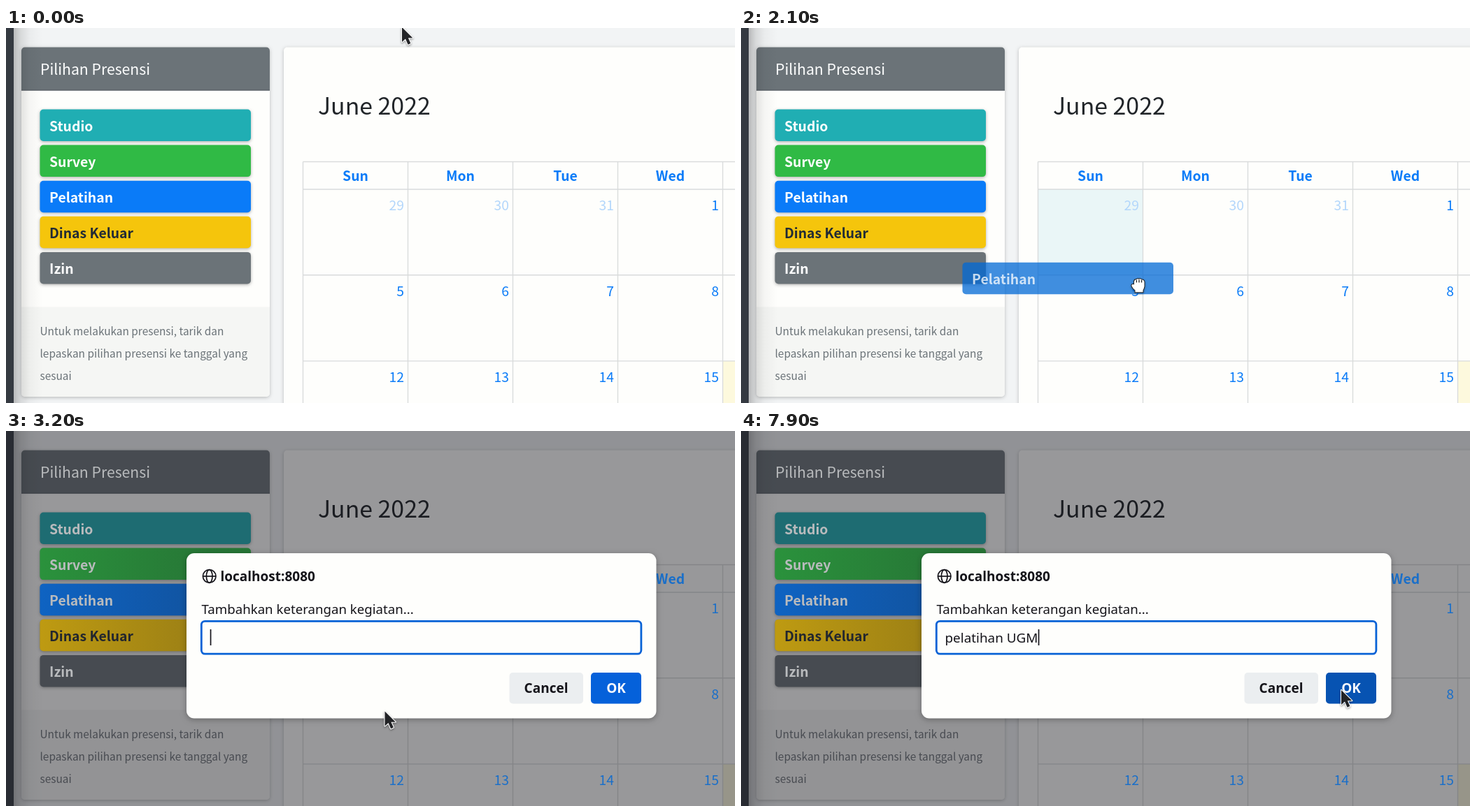
These frames come from a looping animation (1042 px wide and 537 px high, 8000 ms). An HTML page with a canvas:

```html
<!DOCTYPE html>
<html lang="id">
<head>
<meta charset="utf-8">
<title>Pilihan Presensi</title>
<style>
  html, body { margin: 0; width: 100%; height: 100%; overflow: hidden; background: #f2f4f5; }
  canvas { display: block; }
</style>
</head>
<body>
<canvas id="stage" width="1042" height="537"></canvas>
<script>
const ctx = document.getElementById('stage').getContext('2d');
const W = 1042, H = 537, LOOP = 8000, STEP = 100;
const PAGE_FONT = '"Noto Sans CJK JP", "Noto Sans CJK SC", "Noto Sans CJK", "Open Sans", sans-serif';
const DIALOG_FONT = '"Noto Sans", "Open Sans", sans-serif';
const WHITE = '#fefefc', BLUE = '#0a7bf8', GREY = '#6b7378';

const OPTIONS = [
  ['Studio', '#20aeb3'], ['Survey', '#30ba45'], ['Pelatihan', BLUE],
  ['Dinas Keluar', '#f5c50c'], ['Izin', GREY]
];
const OPTION = { x: 48.5, y: 116.5, w: 301.5, h: 45.5, pitch: 51.1 };
const DRAGGED = 2;
const GRAB = { x: 300, y: 252 };

const DAYS = ['Sun', 'Mon', 'Tue', 'Wed'];
const GRID = { x: 424.5, w: 150, top: 191.5, rows: [231, 353.7, 476.8] };

// Pointer path: time, x, y
const PATH = [
  [0, 566, -1], [800, 566, -1], [1200, 361, 234], [1300, 318, 250], [1400, 300, 252],
  [1600, 300, 252], [2100, 568, 369], [2300, 550, 426], [2400, 550, 426], [2500, 542, 418],
  [2800, 542, 418], [2900, 541.5, 401.5], [3500, 541.5, 401.5], [3700, 537, 307],
  [7100, 537, 307], [7200, 545, 320], [7300, 549, 279], [7400, 549, 279],
  [7700, 845, 362], [7900, 858, 371]
];
const TYPED = 'pelatihan UGM';
const KEY_TIMES = [4500, 4600, 4800, 4900, 5100, 5200, 5300, 5700, 5800, 5800, 6100, 6200, 6400];
const CARET_SPANS = [[3200, 4200], [4500, 5500], [5700, 6600], [7500, LOOP]];

const ARROW = new Path2D('M0 0V21L5 16.6L8.6 24.8L12.4 23L8.9 15.2H15.3Z');
const HAND = new Path2D('M-4.5 9.3V6.5Q-8 4-9.5 .5Q-10-2.5-7-2L-6-1.2V-6Q-5.5-9-2.8-8.6' +
  'Q-1.5-10.5 .8-9.3Q3-10.5 4.3-8.5Q7.8-9 8.5-5.5V1Q8 4 6.5 6.5V9.3Z');
const KNUCKLES = new Path2D('M-2.6-8V-4.5M1-8.5V-4.5M4.6-8V-4.5');
const BEAM = new Path2D('M-3.5-8.5Q-.8-8.5 0-7.2Q.8-8.5 3.5-8.5M0-7.2V7.2M-3.5 8.5Q-.8 8.5 0 7.2Q.8 8.5 3.5 8.5');

function within(t, from, to) { return t >= from && t < to; }

function pointerAt(t) {
  const i = PATH.findIndex(p => p[0] > t);
  if (i < 0) return { x: PATH.at(-1)[1], y: PATH.at(-1)[2] };
  const [t0, x0, y0] = PATH[i - 1], [t1, x1, y1] = PATH[i];
  const k = (t - t0) / (t1 - t0);
  return { x: x0 + (x1 - x0) * k, y: y0 + (y1 - y0) * k };
}

function text(str, x, y, size, color, { bold = false, align = 'left', font = PAGE_FONT } = {}) {
  ctx.font = `${bold ? 700 : 400} ${size}px ${font}`;
  ctx.textAlign = align;
  ctx.fillStyle = color;
  ctx.fillText(str, x, y);
}

function shadow(color, blur, dy) {
  ctx.shadowColor = color;
  ctx.shadowBlur = blur;
  ctx.shadowOffsetY = dy;
}

function box(x, y, w, h, radius, fill, glow) {
  ctx.save();
  if (glow) shadow(...glow);
  ctx.beginPath();
  ctx.roundRect(x, y, w, h, radius);
  ctx.fillStyle = fill;
  ctx.fill();
  ctx.restore();
}

function line(x0, y0, x1, y1) {
  ctx.beginPath();
  ctx.moveTo(x0, y0);
  ctx.lineTo(x1, y1);
  ctx.stroke();
}

function fade(x0, x1, ...stops) {
  const g = ctx.createLinearGradient(x0, 0, x1, 0);
  stops.forEach(([at, color]) => g.addColorStop(at, color));
  return g;
}

const CARD_GLOW = ['rgba(0,0,0,.24)', 5, 1.3];
const OPTION_GLOW = ['rgba(0,0,0,.3)', 4, 1.4];

function optionBox(i, fill, glow = OPTION_GLOW) {
  box(OPTION.x, OPTION.y + i * OPTION.pitch, OPTION.w, OPTION.h, 5, fill, glow);
}

function optionLabel(i, color) {
  text(OPTIONS[i][0], 62, 147.6 + i * OPTION.pitch, 19.35, color, { bold: true });
}

function drawPanels(hover, highlightRow) {
  ctx.fillStyle = '#f2f4f5';
  ctx.fillRect(0, 0, W, H);

  box(22, 27.5, 355, 500.5, 5, WHITE, CARD_GLOW);
  box(22, 399.5, 355, 128.5, [0, 0, 5, 5], '#f5f6f4');
  box(22, 27.5, 355, 62, [5, 5, 0, 0], GREY);
  ctx.fillStyle = '#5d646a';
  ctx.fillRect(22, 88.3, 355, 1.3);
  OPTIONS.forEach(([, color], i) => optionBox(i, hover && i === DRAGGED ? '#0668d2' : color));

  box(397, 27.5, 700, 560, 5, WHITE, CARD_GLOW);
  const { x, w, top, rows } = GRID;
  if (highlightRow >= 0) {
    ctx.fillStyle = '#eaf6f7';
    ctx.fillRect(x, rows[highlightRow], w, rows[highlightRow + 1] - rows[highlightRow]);
  }
  ctx.fillStyle = '#fdf9dd';
  ctx.fillRect(x + 4 * w, rows[2], W, H);
  ctx.strokeStyle = '#d9dbdc';
  ctx.lineWidth = 1.35;
  for (let c = 0; c < 5; c++) line(x + c * w, top, x + c * w, H);
  [top, ...rows].forEach(y => line(x, y, W, y));

  ctx.fillStyle = fade(11, 52, [0, 'rgba(0,0,0,.24)'], [.25, 'rgba(0,0,0,.11)'], [.55, 'rgba(0,0,0,.035)'], [1, 'rgba(0,0,0,0)']);
  ctx.fillRect(11, 0, 41, H);
  ctx.fillStyle = '#353a41';
  ctx.fillRect(0, 0, 11, H);
}

function dimPage() {
  ctx.fillStyle = 'rgba(28,27,34,.45)';
  ctx.fillRect(0, 0, W, H);
  // The vivid options keep more of their colour towards the left
  for (let i = 1; i < 4; i++) {
    const color = OPTIONS[i][1];
    optionBox(i, fade(OPTION.x, 290, [0, color + '70'], [1, color + '10']), null);
  }
}

function drawLabels(dim) {
  const light = dim ? '#b9bbbd' : '#fdfefe';
  const blue = dim ? '#1a6fc9' : BLUE;
  const muted = dim ? '#484b51' : GREY;
  text('Pilihan Presensi', 49, 66.8, 21.2, light);
  OPTIONS.forEach((_, i) => optionLabel(i, i === 3 ? (dim ? '#22262e' : '#222b35') : light));
  ['Untuk melakukan presensi, tarik dan', 'lepaskan pilihan presensi ke tanggal yang', 'sesuai']
    .forEach((row, i) => text(row, 48.5, 439.7 + i * 32.2, 15.4, muted));

  text('June 2022', 446, 124, 33.85, dim ? '#1b1d22' : '#212529');
  const { x, w, rows } = GRID;
  DAYS.forEach((day, c) => {
    text(day, x + (c + .5) * w, 219.3, 19.35, blue, { bold: true, align: 'center' });
    rows.forEach((y, r) => {
      const n = r * 7 + c - 2;
      const outside = n < 1;
      const color = outside && !dim ? '#b2d6fb' : blue;
      text(outside ? n + 31 : n, x + (c + 1) * w - 5.5, y + 30.2, 19.35, color, { align: 'right' });
    });
  });
}

function drawGhost(p) {
  ctx.save();
  ctx.globalAlpha = .75;
  ctx.translate(p.x - GRAB.x, p.y - GRAB.y);
  optionBox(DRAGGED, '#0069d6', null);
  optionLabel(DRAGGED, '#fff');
  ctx.restore();
}

function drawGlobe(x, y) {
  ctx.strokeStyle = '#15141a';
  ctx.lineWidth = 1.7;
  for (const rx of [9.3, 4.3]) {
    ctx.beginPath();
    ctx.ellipse(x, y, rx, 9.3, 0, 0, Math.PI * 2);
    ctx.stroke();
  }
  line(x - 9.3, y, x + 9.3, y);
}

function drawDialog(t, okHover) {
  const ink = '#15141a', bold = { bold: true, font: DIALOG_FONT };
  box(258, 175, 671.5, 236.5, 11, WHITE, ['rgba(0,0,0,.3)', 8, 2]);
  drawGlobe(290.7, 208);
  text('localhost:8080', 306.5, 215, 19, ink, bold);
  text('Tambahkan keterangan kegiatan...', 279.5, 262.3, 18.65, ink, { font: DIALOG_FONT });

  ctx.beginPath();
  ctx.roundRect(279.3, 272.3, 628.6, 46.8, 5);
  ctx.strokeStyle = '#0862d6';
  ctx.lineWidth = 2.8;
  ctx.stroke();

  const typed = TYPED.slice(0, KEY_TIMES.filter(k => t >= k).length);
  text(typed, 291.5, 303, 18.9, ink, { font: DIALOG_FONT });
  if (CARET_SPANS.some(span => within(t, ...span))) {
    ctx.fillRect(291.7 + ctx.measureText(typed).width, 284, 1.7, 23);
  }

  box(719.5, 346, 105.5, 44.5, 5, '#ebeef0');
  box(836, 346, 72, 44.5, 5, okHover ? '#0753b2' : '#0561da');
  text('Cancel', 772, 375.3, 19, ink, { ...bold, align: 'center' });
  text('OK', 872, 375.3, 19, '#fbfbfe', { ...bold, align: 'center' });
}

function outlined(path, fill, stroke, width) {
  ctx.lineJoin = 'round';
  ctx.save();
  shadow('rgba(0,0,0,.4)', 3, 1.3);
  ctx.strokeStyle = stroke;
  ctx.lineWidth = width;
  ctx.stroke(path);
  ctx.restore();
  ctx.fillStyle = fill;
  ctx.fill(path);
}

function drawPointer(t, p) {
  ctx.save();
  ctx.translate(p.x, p.y);
  if (within(t, 1200, 2900)) {
    outlined(HAND, '#fff', '#222', 2);
    ctx.strokeStyle = '#222';
    ctx.lineWidth = 1.3;
    ctx.stroke(KNUCKLES);
  } else if (within(t, 3700, 7600)) {
    ctx.strokeStyle = '#fff';
    ctx.lineWidth = 4;
    ctx.stroke(BEAM);
    ctx.strokeStyle = '#222';
    ctx.lineWidth = 1.7;
    ctx.stroke(BEAM);
  } else {
    outlined(ARROW, '#222326', '#fff', 2.2);
  }
  ctx.restore();
}

function draw(t) {
  const p = pointerAt(t);
  const dim = t >= 3200;
  const highlightRow = within(t, 2000, 2200) ? 0 : within(t, 2200, 2900) ? 1 : -1;
  drawPanels(within(t, 1200, 1700), highlightRow);
  if (dim) dimPage();
  drawLabels(dim);
  if (within(t, 1700, 2900)) drawGhost(p);
  if (dim) drawDialog(t, t >= 7700);
  drawPointer(t, p);
}

const start = performance.now();
function tick() {
  const t = (performance.now() - start) % LOOP;
  draw(Math.floor(t / STEP) * STEP);
  requestAnimationFrame(tick);
}
tick();
</script>
</body>
</html>
```
